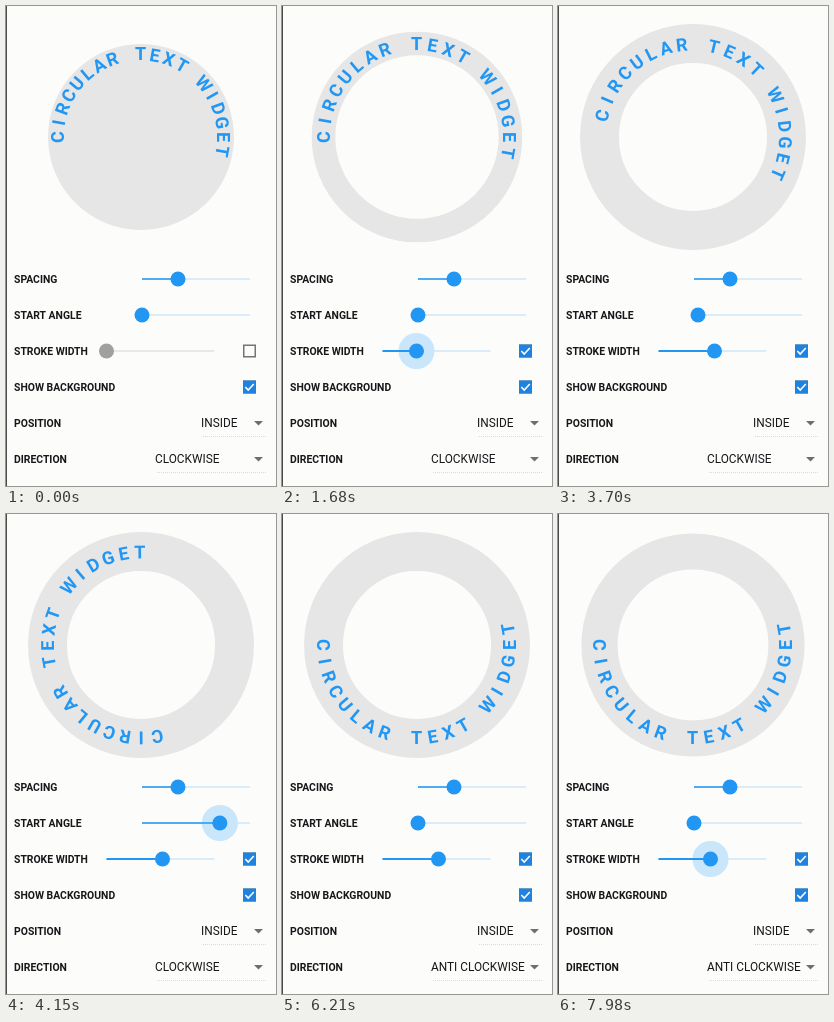
Write an HTML page with a canvas that moves like this. It is 270 px wide and 480 px high and loops after 8000 ms.

```html
<!DOCTYPE html>
<html lang="en">
<head>
<meta charset="utf-8">
<title>Circular text widget</title>
<style>
html, body { margin: 0; width: 100%; height: 100%; overflow: hidden; background: #fcfcfb; }
canvas { display: block; width: 270px; height: 480px; }
</style>
</head>
<body>
<canvas width="270" height="480"></canvas>
<script>
const LOOP = 8000, CX = 135, CY = 131, RADIUS = 93.5;
const BG = '#fcfcfb', DISC = '#e6e6e6', BLUE = '#2196f3', CHECK = '#1e82e0';
const TRACK = '#b9dbf7', GRAY = '#a0a0a0', HALO = '#c9e6fb', INK = '#17171a';
const TEXT = 'CIRCULAR TEXT WIDGET';
const ctx = document.querySelector('canvas').getContext('2d');

// Each key is [time, value]; values ease in and out between keys.
const strokeKeys = [[1080, 0], [1350, 80], [1870, 15], [1900, 15], [2280, 74], [2690, 28.5],
  [2720, 28.5], [3050, 56], [6960, 56], [7230, 108], [7470, 108], [7980, 52]];
const angleKeys = [[3699, 0], [3700, 4], [4090, 82], [4500, 5], [4530, 5], [4660, 0]];
const strokeHaloKeys = [[1080, 0], [1180, 1], [3030, 1], [3170, 0], [6960, 0], [7060, 1]];
const angleHaloKeys = [[3700, 0], [3800, 1], [4620, 1], [4750, 0]];
const rippleKeys = [[60, 0], [220, 1], [440, 1], [700, 0]];
const checkKeys = [[440, 0], [560, 1]];
const popupKeys = [[5410, 0], [5640, 1], [5980, 1], [6200, 0]];

function at(keys, t) {
  const i = keys.findIndex(key => key[0] > t);
  if (i === 0) return keys[0][1];
  if (i < 0) return keys[keys.length - 1][1];
  const [t0, a] = keys[i - 1], [t1, b] = keys[i];
  return a + (b - a) * (1 - Math.cos(Math.PI * (t - t0) / (t1 - t0))) / 2;
}

function disc(x, y, r, color, alpha = 1) {
  ctx.globalAlpha = alpha;
  ctx.fillStyle = color;
  ctx.beginPath();
  ctx.arc(x, y, r, 0, 7);
  ctx.fill();
  ctx.globalAlpha = 1;
}

function bar(x, y, w, h, color) {
  ctx.fillStyle = color;
  ctx.fillRect(x, y, w, h);
}

function polyline(points, color, width) {
  ctx.strokeStyle = color;
  ctx.lineWidth = width;
  ctx.beginPath();
  points.forEach(p => ctx.lineTo(...p));
  ctx.stroke();
}

function write(text, x, y, font, color = INK) {
  ctx.font = font + ' Roboto, sans-serif';
  ctx.fillStyle = color;
  ctx.fillText(text, x, y);
}

const label = (text, y) => write(text, 8, y + 4, 'bold 10.4px');
const option = (text, x, y) => write(text, x, y + 4.3, '11.85px');

function slider(x, y, value, halo, enabled = true, weight = 1.5) {
  bar(x, y - .5, 108, 1, enabled ? TRACK : '#d6d6d6');
  if (halo) disc(x + value, y, 8 + 10 * halo, HALO, halo);
  if (enabled) bar(x, y - weight / 2, value, weight, BLUE);
  disc(x + value, y, 7.5, enabled ? BLUE : GRAY);
}

function checkbox(y, checked) {
  ctx.strokeStyle = '#757575';
  ctx.lineWidth = 1.5;
  ctx.strokeRect(237.75, y - 5.75, 11.5, 11.5);
  if (!checked) return;
  ctx.globalAlpha = checked;
  bar(237, y - 6.5, 13, 13, CHECK);
  polyline([[239.3, y], [242.2, y + 3], [247.8, y - 3]], '#fff', 1.6);
  ctx.globalAlpha = 1;
}

function spinner(text, x, y) {
  option(text, x, y);
  ctx.fillStyle = '#6e6e6e';
  ctx.beginPath();
  ctx.moveTo(248, y - 2);
  ctx.lineTo(257, y - 2);
  ctx.lineTo(252.5, y + 2.5);
  ctx.fill();
  ctx.setLineDash([1, 1]);
  polyline([[x + 2, y + 13.5], [260, y + 13.5]], '#dadade', 1);
  ctx.setLineDash([]);
}

function background(stroke) {
  if (!stroke) return disc(CX, CY, 93, DISC);
  ctx.strokeStyle = DISC;
  ctx.lineWidth = stroke * .695;
  ctx.beginPath();
  ctx.arc(CX, CY, RADIUS, 0, 7);
  ctx.stroke();
}

function circularText(radius, start, reverse) {
  const dir = reverse ? -1 : 1;
  ctx.textAlign = 'center';
  [...TEXT].forEach((letter, i) => {
    ctx.save();
    ctx.translate(CX - .5, CY);
    ctx.rotate(dir * (start + i * 10 - 90) * Math.PI / 180);
    write(letter, 0, 6.4 - dir * radius, 'bold 18px', BLUE);
    ctx.restore();
  });
  ctx.textAlign = 'left';
}

function popup(alpha) {
  if (!alpha) return;
  ctx.save();
  ctx.globalAlpha = alpha;
  ctx.shadowColor = 'rgba(0,0,0,.35)';
  ctx.shadowBlur = 8;
  ctx.shadowOffsetY = 2;
  bar(142, 394, 122, 82, '#fff');
  ctx.shadowColor = 'transparent';
  option('CLOCKWISE', 149, 417);
  option('ANTI CLOCKWISE', 149, 453);
  ctx.restore();
}

function draw(t) {
  const stroke = at(strokeKeys, t), angle = at(angleKeys, t);
  const checked = at(checkKeys, t), ripple = at(rippleKeys, t);
  const reverse = t >= 6010;

  bar(0, 0, 270, 480, BG);
  background(stroke);
  circularText(stroke > 0 ? 93 : 83, angle / 108 * 360, reverse);

  label('SPACING', 273);
  slider(136, 273, 36, 0);
  label('START ANGLE', 309);
  slider(136, 309, angle, at(angleHaloKeys, t));
  label('STROKE WIDTH', 345);
  slider(100.5, 345, stroke, at(strokeHaloKeys, t), checked > 0, 2);
  if (ripple) disc(243.5, 345, t < 440 ? 18 * ripple : 18, '#808080', .2 * ripple);
  checkbox(345, checked);
  label('SHOW BACKGROUND', 381);
  checkbox(381, 1);
  label('POSITION', 417);
  spinner('INSIDE', 195, 417);
  label('DIRECTION', 453);
  spinner(reverse ? 'ANTI CLOCKWISE' : 'CLOCKWISE', 149, 453);
  popup(at(popupKeys, t));

  bar(0, 0, 1, 480, '#4a4a4a');
}

function tick() {
  draw(performance.now() % LOOP);
  requestAnimationFrame(tick);
}
tick();
</script>
</body>
</html>
```
